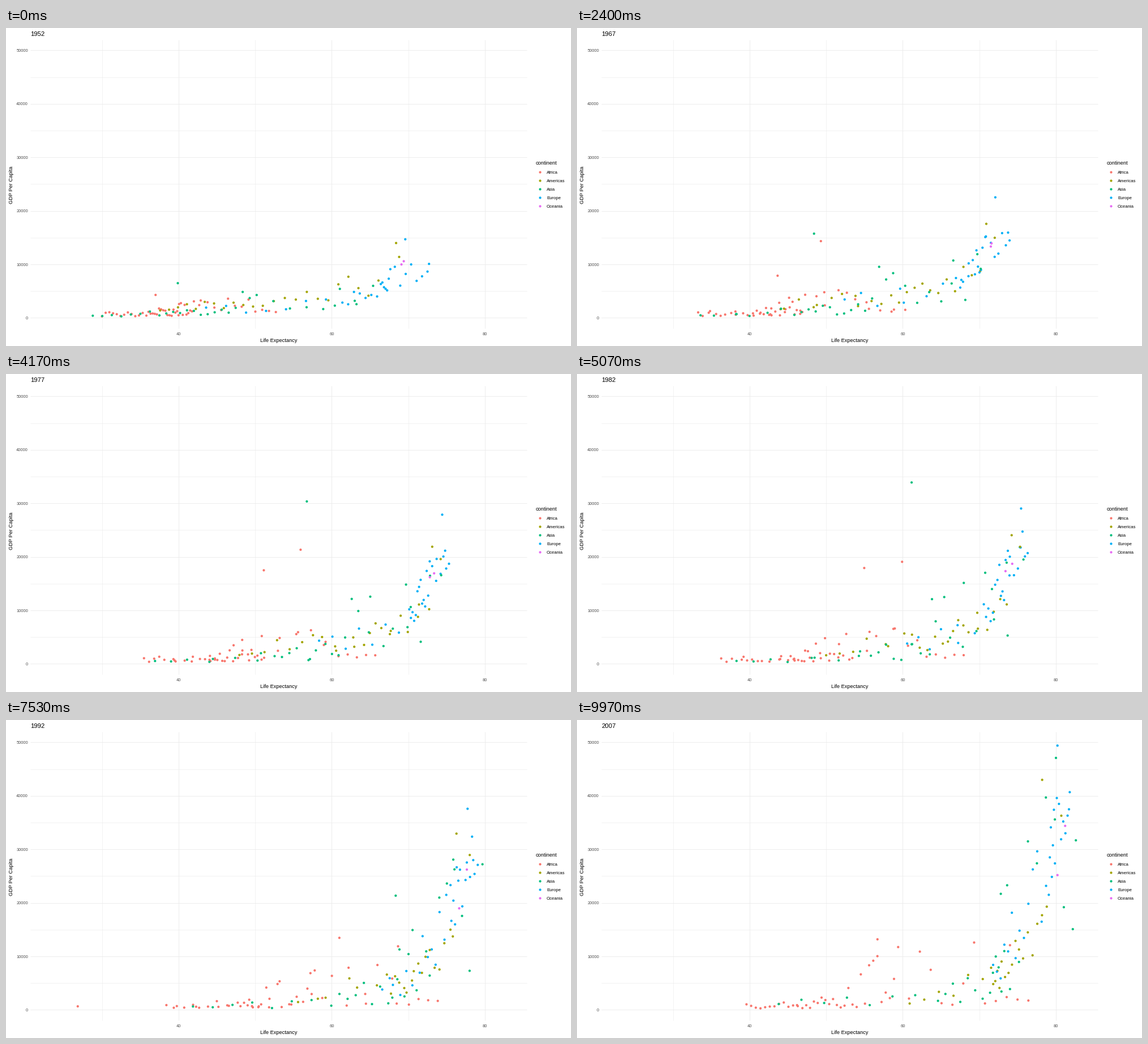
A matplotlib script that plays this animation: 998 by 561 pixels, repeating every 10 s.

```python
import numpy as np
import matplotlib.pyplot as plt
from matplotlib.animation import FuncAnimation

W, H, DPI = 998, 561, 128
PX = 72 / DPI  # points per pixel
FRAMES, LOOP = 300, 10000
STATES = np.arange(52, 108, 5)  # years since 1900
KEYS = (52, 72, 92, 107)
PALETTE = {"Africa": "#F8766D", "Americas": "#A3A500", "Asia": "#00BF7D",
           "Europe": "#00B0F6", "Oceania": "#E76BF3"}

plt.rcParams["font.family"] = "Liberation Sans"
rng = np.random.default_rng(7)
colors, tracks = [], []


def ranks(score):
    return score.argsort().argsort() / (len(score) - 1)


def spread(rank, quartiles, year):
    """Value at a rank, from quartiles that shift between the key years."""
    now = [np.interp(year, KEYS, q) for q in zip(*quartiles)]
    return np.interp(rank, np.linspace(0, 1, 5), now)


def crowd(name, count, tie, drift, life, gdp):
    """Seeded countries; tie links wealth to life, drift reorders them over time."""
    start, end, wealth = rng.random((3, count))
    steps = []
    for year in STATES:
        u = drift * (year - STATES[0]) / np.ptp(STATES)
        rank = ranks((1 - u) * start + u * end)
        rich = ranks(tie * rank + (1 - tie) * wealth)
        steps.append(np.stack([spread(rank, life, year), spread(rich, gdp, year)], -1))
    tracks.extend(np.stack(steps, axis=1))
    colors.extend([PALETTE[name]] * count)


def country(name, *points):
    """One standout path through (year, life expectancy, GDP in hundreds)."""
    year, life, gdp = zip(*points)
    tracks.append(np.stack([np.interp(STATES, year, life),
                            np.interp(STATES, year, gdp)], -1))
    colors.append(PALETTE[name])


# Quartiles of life expectancy and of GDP in hundreds, one row per key year
crowd("Africa", 49, 0.5, 0.4,
      life=[(30.0, 35.8, 39.1, 42.0, 52.7), (35.0, 42.7, 46.5, 50.0, 64.3),
            (38.3, 47.8, 52.0, 58.7, 73.6), (39.6, 46.9, 52.9, 59.4, 76.4)],
      gdp=[(3, 7, 11, 16, 36), (4, 8, 13, 19, 60),
           (4, 7, 11, 23, 80), (3, 8, 13, 24, 126)])
crowd("Americas", 23, 0.6, 0.3,
      life=[(37.6, 44.0, 51.0, 58.9, 66.1), (46.7, 55.3, 62.4, 66.8, 72.2),
            (55.1, 66.5, 69.6, 72.2, 75.7), (60.9, 71.4, 72.9, 75.4, 78.8)],
      gdp=[(14, 22, 30, 38, 77), (17, 30, 50, 60, 105),
           (15, 40, 62, 78, 146), (12, 52, 73, 105, 193)])
crowd("Asia", 29, 0.65, 0.3,
      life=[(28.8, 37.5, 43.8, 50.2, 65.4), (36.1, 50.2, 56.8, 63.2, 72.0),
            (41.7, 59.5, 67.0, 70.8, 77.6), (43.8, 64.6, 71.4, 74.0, 82.2)],
      gdp=[(3, 7, 12, 20, 60), (4, 9, 20, 45, 150),
           (3, 13, 29, 75, 250), (9, 23, 39, 110, 397)])
crowd("Europe", 28, 0.7, 0.3,
      life=[(43.6, 61.2, 66.3, 67.7, 72.5), (57.0, 69.8, 70.9, 72.2, 74.7),
            (66.1, 71.6, 75.0, 76.5, 78.8), (71.8, 75.1, 79.0, 79.9, 81.8)],
      gdp=[(10, 31, 50, 70, 100), (29, 80, 106, 158, 189),
           (25, 75, 170, 242, 268), (59, 144, 257, 333, 407)])

country("Africa", (52, 42.7, 24), (62, 47.8, 68), (67, 50.2, 188), (77, 57.4, 220),
        (87, 66.2, 118), (107, 74, 121))
country("Africa", (52, 37, 43), (67, 44.6, 84), (72, 48.7, 114), (77, 52.8, 217),
        (82, 56.6, 151), (92, 61.4, 135), (107, 56.7, 132))
country("Africa", (52, 40, 5), (82, 46.2, 9), (87, 44, 8), (92, 23.6, 7),
        (97, 36.1, 6), (107, 46.2, 9))
country("Americas", (52, 68.4, 140), (62, 70.2, 162), (82, 74.7, 250), (92, 76.1, 320),
        (107, 78.2, 430))
country("Americas", (52, 68.8, 114), (62, 71.3, 135), (82, 75.8, 229), (107, 80.7, 363))
country("Asia", (52, 39.9, 65), (62, 45.9, 116), (72, 53.9, 248), (77, 58.7, 342),
        (82, 63, 337), (87, 66.3, 212), (107, 72.8, 217))
country("Asia", (52, 63, 32), (62, 68.7, 66), (72, 73.4, 148), (92, 79.4, 268),
        (107, 82.6, 317))
country("Asia", (52, 60.4, 23), (72, 69.5, 86), (87, 73.6, 189), (97, 77.2, 335),
        (107, 80, 471))
country("Europe", (52, 69.6, 147), (62, 71.3, 204), (72, 73.8, 272), (92, 78, 319),
        (107, 81.7, 375))
country("Europe", (52, 72.7, 101), (72, 74.3, 190), (82, 76, 263), (97, 78.3, 413),
        (107, 80.2, 494))
country("Oceania", (52, 69.1, 100), (62, 70.9, 122), (82, 74.7, 195), (107, 81.2, 344))
country("Oceania", (52, 69.4, 106), (62, 71.2, 132), (87, 74.3, 190), (92, 76.3, 184),
        (107, 80.2, 252))


def to_x(life):
    return 304.3 + 13.53 * (life - 40)


def to_y(gdp):
    return 511 - 0.944 * gdp


places = np.array(tracks)
places = np.stack([to_x(places[..., 0]), to_y(places[..., 1])], axis=-1)
last = len(STATES) - 1
marks = np.minimum(np.round(np.arange(last + 1) * FRAMES / last), FRAMES - 1)

fig = plt.figure(figsize=(W / DPI, H / DPI), dpi=DPI, facecolor="white")
ax = fig.add_axes([0, 0, 1, 1])
ax.set(xlim=(-0.5, W - 0.5), ylim=(H - 0.5, -0.5))  # whole numbers are pixel centres
ax.axis("off")


def label(x, y, text, size, color="black", **kw):
    return ax.text(x, y, text, fontsize=size * PX, color=color, **kw)


def grid(x, y, major):
    ax.plot(x, y, color="#EBEBEB", lw=(0.85 if major else 0.6) * PX,
            solid_capstyle="butt", zorder=1)


for n in range(11):
    y = to_y(50 * n)
    grid([43, 920], [y, y], n % 2 == 0)
    if n % 2 == 0:
        label(38.4, y + 2.6, str(5000 * n), 7.5, "#4D4D4D", ha="right")
for life in range(30, 81, 10):
    x = to_x(life)
    major = life % 20 == 0
    grid([x, x], [21, 530], major)
    if major:
        label(x, 542, str(life), 7.5, "#4D4D4D", ha="center")

label(481.3, 554, "Life Expectancy", 9.25, ha="center")
label(9.3, 276, "GDP Per Capita", 9.25, ha="center", va="center", rotation=90)
title = label(42.6, 13.8, "", 11.2)

DOT = (4.2 * PX) ** 2
label(935.2, 240.5, "continent", 9.25)
for n, (name, color) in enumerate(PALETTE.items()):
    y = 254 + 14.9 * n
    ax.scatter([943], [y], s=DOT, c=color, linewidths=0)
    label(954.6, y + 2.8, name, 7.8)

dots = ax.scatter(*places[:, 0].T, s=DOT, c=colors, linewidths=0, zorder=3)


def draw(frame):
    pos = np.interp(frame, marks, np.arange(last + 1))
    k = min(int(pos), last - 1)
    u = pos - k
    dots.set_offsets((1 - u) * places[:, k] + u * places[:, k + 1])
    title.set_text(str(1900 + STATES[int(pos + 0.5)]))
    return dots, title


anim = FuncAnimation(fig, draw, frames=FRAMES, interval=LOOP / FRAMES,
                     repeat=True, repeat_delay=0)
plt.show()
```
